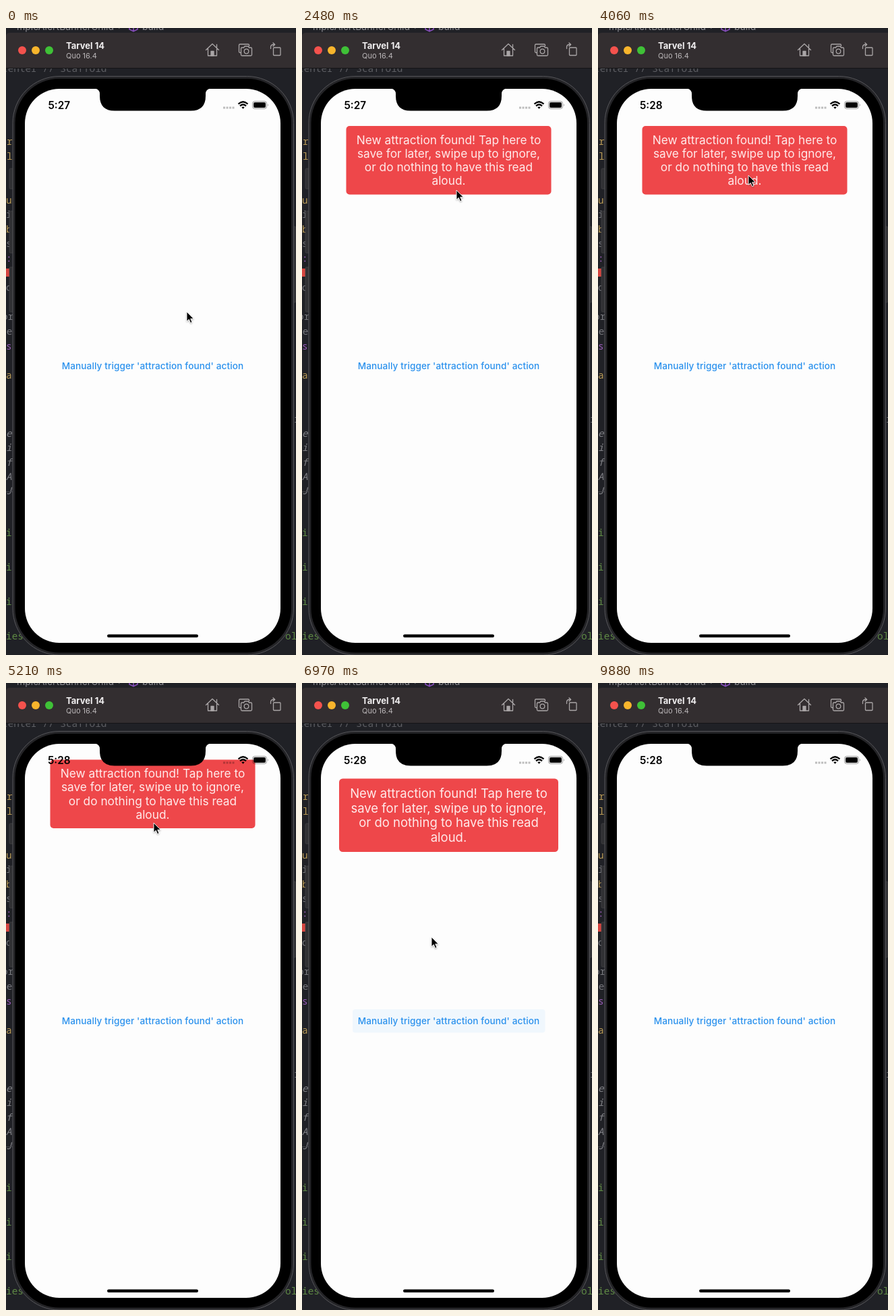
An HTML page for the animation above (9910 ms loop, 430 px wide and 928 px high).

```html
<!DOCTYPE html>
<html lang="en">
<head>
<meta charset="utf-8">
<title>Alert banner demo</title>
<style>
  html, body { margin: 0; width: 100%; height: 100%; overflow: hidden; background: #202126; }
  svg { display: block; width: 430px; height: 928px; font-family: Inter, sans-serif; }
  .code { font: 14.4px "Noto Sans Mono", monospace; }
  .icon { fill: none; stroke: #aaa6a7; stroke-width: 1.3; stroke-linejoin: round; stroke-linecap: round; }
  .mid { text-anchor: middle; }
</style>
</head>
<body>
<svg viewBox="0 0 430 928">
  <defs>
    <clipPath id="screenClip"><rect x="28" y="90" width="379" height="820" rx="51"/></clipPath>
    <clipPath id="buttonClip"><rect x="75" y="483" width="285.500" height="34.500" rx="4"/></clipPath>
    <filter id="shadow" x="-50%" y="-50%" width="200%" height="200%">
      <feDropShadow dx="0" dy="1" stdDeviation="1" flood-opacity=".35"/>
    </filter>
  </defs>

  <!-- Editor behind the simulator -->
  <rect width="430" height="928" fill="#202126"/>
  <g font-size="14" fill="#8d8d92">
    <text x="160" y="3" text-anchor="end">mpleAlertBannerChild</text>
    <text x="202" y="3">build</text>
    <path d="M183-2v4l6 3 6-3v-4M189-2v6" fill="none" stroke="#8a4fc0" stroke-width="1.500"/>
    <path d="M167-5l4 3-4 3" fill="none" stroke="#77777c"/>
  </g>
  <text class="code" x="-6" y="65" fill="#5d5e63">center // Scaffold</text>
  <g id="editor" class="code"></g>
  <rect y="356" width="5" height="12" fill="#d64540"/>
  <path d="M0 686.500h10" stroke="#45464b"/>

  <!-- Simulator title bar -->
  <path d="M0 59V11q1-4 6-4H430V59z" fill="#332e30"/>
  <path d="M0 59.500H430" stroke="#141416"/>
  <circle cx="24" cy="33" r="6" fill="#f4524d"/>
  <circle cx="44" cy="33" r="6" fill="#f8b52c"/>
  <circle cx="64" cy="33" r="6" fill="#3fc137"/>
  <text x="89" y="31" font-size="13" font-weight="700" fill="#f1eff0">Tarvel 14</text>
  <text x="89" y="45" font-size="11" fill="#bab6b8">Quo 16.4</text>
  <g class="icon">
    <path d="M296.500 32.500L306 23.500l9.500 9M299.500 30.500v10.500h13V30.500M312.500 29v-4.500"/>
    <path d="M304 41v-6.500h4V41z" fill="#aaa6a7"/>
    <path d="M348.500 36.500H347a1.500 1.500 0 0 1-1.500-1.500V25.500a1.500 1.500 0 0 1 1.500-1.500h12a1.500 1.500 0 0 1 1.500 1.500v1"/>
    <path d="M350 29h2.500l1.500-2h5l1.500 2h2.500a1.500 1.500 0 0 1 1.500 1.500v9a1.500 1.500 0 0 1-1.500 1.500H350a1.500 1.500 0 0 1-1.500-1.500v-9A1.500 1.500 0 0 1 350 29z"/>
    <circle cx="356.500" cy="34.500" r="3.300"/>
    <rect x="396.500" y="29" width="10.500" height="11.500" rx="1"/>
    <path d="M392.500 30.500v-2q0-4 4-4h2M396 22l2.700 2.500L396 27"/>
  </g>

  <!-- Phone -->
  <g fill="#303033" stroke="#46464a" stroke-width=".7">
    <rect x="5" y="208" width="8" height="30" rx="1.500"/>
    <rect x="5" y="271" width="8" height="62" rx="1.500"/>
    <rect x="5" y="354" width="8" height="66" rx="1.500"/>
    <rect x="424" y="294" width="6" height="112" rx="1.500"/>
  </g>
  <rect x="10" y="71.500" width="416.500" height="856.500" rx="69" fill="#242427" stroke="#56565a"/>
  <rect x="13.500" y="75" width="409.500" height="849.500" rx="65.500" fill="#000"/>
  <rect x="28" y="90" width="379" height="820" rx="51" fill="#fdfdfd"/>

  <g clip-path="url(#screenClip)">
    <g id="ink" clip-path="url(#buttonClip)" fill="#2196f3">
      <rect x="75" y="483" width="286" height="35" opacity=".14"/>
      <circle id="splash" cy="500" opacity=".15"/>
    </g>
    <text class="mid" x="217.500" y="504.500" font-size="13.600" font-weight="500" letter-spacing=".1" fill="#2a91ed">Manually trigger 'attraction found' action</text>
    <g id="banner">
      <rect x="65.500" y="145" width="304" height="101.500" rx="5" fill="#ee474a"/>
      <g class="mid" font-size="17.300" fill="#ffeaea">
        <text x="217.500" y="171.500">New attraction found! Tap here to</text>
        <text x="217.500" y="191.800">save for later, swipe up to ignore,</text>
        <text x="217.500" y="212.100">or do nothing to have this read</text>
        <text x="217.500" y="232.400">aloud.</text>
      </g>
    </g>
  </g>

  <!-- Notch, status bar and home indicator -->
  <path d="M132 89.500q7 1.500 7 8v3q0 22 22 22H274q22 0 22-22v-3q0-6.500 7-8z"/>
  <text id="clock" class="mid" x="78.700" y="119.500" font-size="15.300" font-weight="600"></text>
  <path d="M322 118H338.500" stroke="#000" stroke-opacity=".25" stroke-width="3" stroke-dasharray="3 1.500"/>
  <g fill="none" stroke="#000" stroke-width="2.300">
    <path d="M344.500 112.500q7-6.500 14 0M347 115.300q4.500-4 9 0"/>
  </g>
  <path d="M349.300 117.300q2.200-1.800 4.400 0l-2.200 2.400z"/>
  <rect x="365.500" y="108.500" width="21" height="11" rx="3.300" fill="none" stroke="#000" stroke-opacity=".4"/>
  <rect x="367" y="110" width="18" height="8" rx="2"/>
  <path d="M388 112.200q1.700 1.800 0 3.600z" fill-opacity=".45"/>
  <rect x="150" y="897.500" width="135" height="4.500" rx="2.250"/>

  <path id="cursor" d="M0 0V14.200L3.300 11.200L5.600 16.500L8 15.500L5.700 10.300H10.200z" stroke="#fff" stroke-width=".9" filter="url(#shadow)"/>
</svg>
<script>
const LOOP = 9910;
const $ = id => document.getElementById(id);
const clamp = x => Math.min(1, Math.max(0, x));
const progress = (t, start, length) => clamp((t - start) / length);
const smooth = p => p * p * (3 - 2 * p);
const linear = p => p;

// Letters of the code that show beside the phone: x, baseline, text, colour
const yellow = "#b99a55", grey = "#77787d", purple = "#9a5bb8", green = "#5f8a45", comment = "#808186";
[
  [1, 173, "r", yellow], [1, 195, "l", yellow], [0, 260, "u", yellow], [0, 281, "i", grey],
  [0, 303, "b", yellow], [0, 324, "s", grey], [0, 346, ":", purple], [0, 389, "o", grey],
  [-6, 432, "or", grey], [-8, 454, "De", grey], [0, 476, "s", purple], [0, 519, "a", yellow],
  [0, 605, "e", comment], [0, 626, "i", comment], [0, 648, "f", comment], [0, 669, "A", comment],
  [0, 690, "J", comment], [0, 752, "i", green], [0, 803, "i", green], [0, 854, "i", green],
  [0, 905, "ies", green], [414, 905, "ol", green], [427, 584, "i", grey], [428, 605, ",", grey]
].forEach(([x, y, letters, colour]) => {
  const text = document.createElementNS("http://www.w3.org/2000/svg", "text");
  text.setAttribute("x", x);
  text.setAttribute("y", y);
  text.setAttribute("fill", colour);
  if (colour === comment) text.setAttribute("font-style", "italic");
  text.textContent = letters;
  $("editor").append(text);
});

// Keys are [time, ...values]
const cursorPath = [
  [0, 268, 420], [250, 268, 420], [1050, 217, 491], [1450, 217, 491], [2200, 229, 240],
  [2900, 229, 240], [4000, 223, 218], [4700, 223, 218], [5000, 220, 238], [5130, 220, 238],
  [5210, 219, 207], [5340, 216, 150], [5550, 214, 150], [6300, 197, 491], [6660, 197, 491],
  [7360, 185, 215], [8350, 185, 215], [9000, 150, 260], [9600, -15, 330]
];
const swipePath = [[5130, 0], [5210, -31], [5330, -92], [5600, -180]];
const presses = [[1220, 1400], [6460, 6640]];

function sample(keys, t, ease) {
  const next = keys.findIndex(key => key[0] > t);
  if (next === 0) return keys[0].slice(1);
  if (next < 0) return keys.at(-1).slice(1);
  const a = keys[next - 1], b = keys[next];
  const p = ease(progress(t, a[0], b[0] - a[0]));
  return a.slice(1).map((v, i) => v + (b[i + 1] - v) * p);
}

function easeOutBack(p) {
  const u = p - 1;
  return 1 + 2.70158 * u ** 3 + 1.70158 * u * u;
}

function render(t) {
  const [x, y] = sample(cursorPath, t, smooth);
  $("cursor").setAttribute("transform", `translate(${x} ${y})`);

  const second = t > 6000;
  const [press, release] = presses[+second];
  $("ink").setAttribute("opacity", progress(t, press, 75) * (1 - progress(t, release, 420)));
  $("splash").setAttribute("cx", second ? 197 : 217);
  $("splash").setAttribute("r", 45 + 120 * progress(t, press, 285));

  const shrink = second ? 1 - progress(t, 8300, 350) ** 2 : 1;
  const scale = Math.max(0, easeOutBack(progress(t, release, 450))) * shrink;
  const lift = second ? 0 : sample(swipePath, t, linear)[0];
  $("banner").setAttribute("transform",
    `translate(217.5 ${196 + lift}) scale(${scale}) translate(-217.5 -196)`);

  $("clock").textContent = t < 3200 ? "5:27" : "5:28";
}

function tick() {
  render(performance.now() % LOOP);
  requestAnimationFrame(tick);
}
tick();
</script>
</body>
</html>
```
